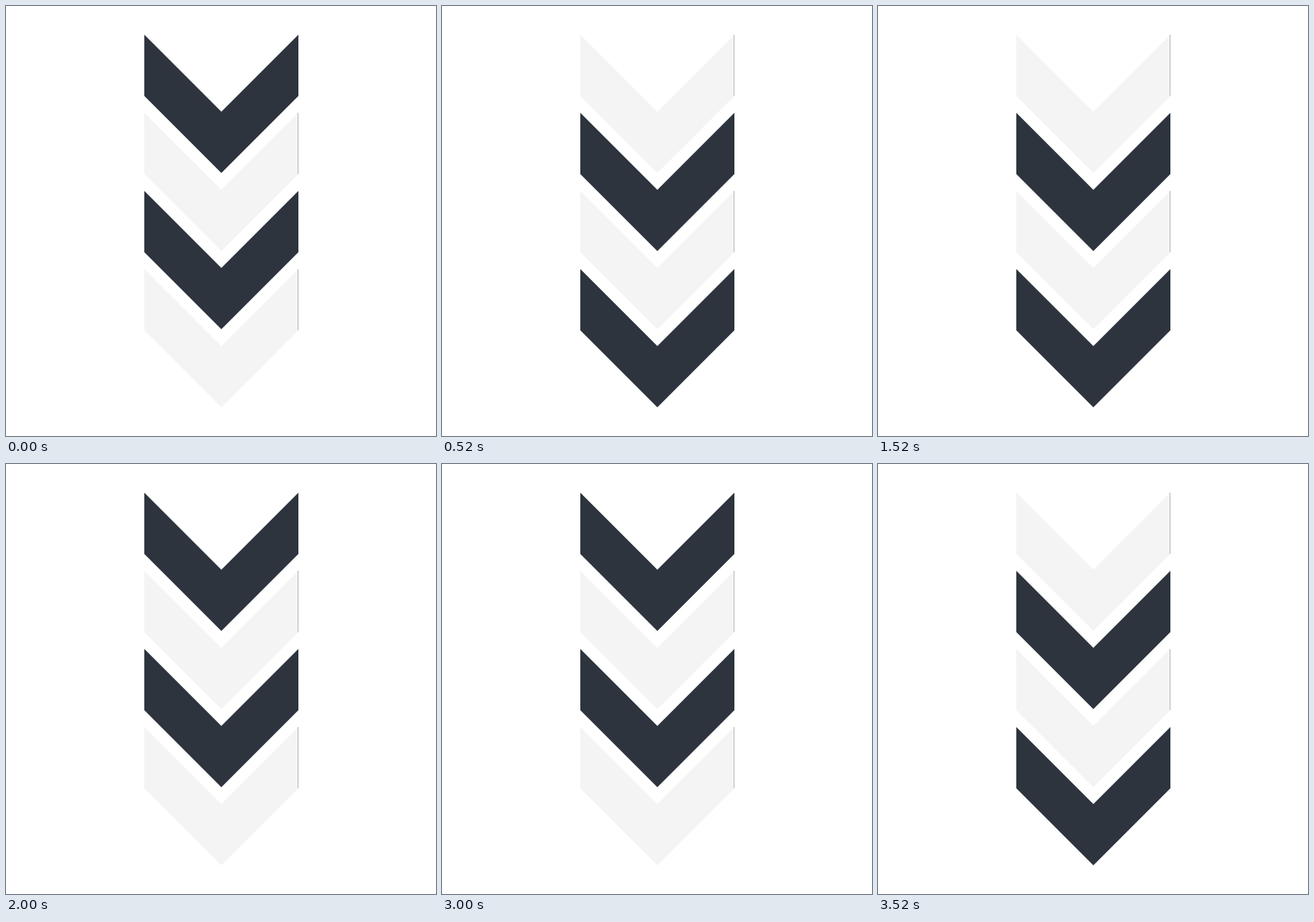
Animation, 600 px wide and 600 px high, one loop 4 s. Source, as an HTML page:

```html
<!DOCTYPE html>
<html lang="en">
<head>
<meta charset="utf-8">
<title>Alternating chevrons</title>
<style>
  html, body { margin: 0; width: 100%; height: 100%; overflow: hidden; background: #fff; }
  svg { display: block; width: 100vw; height: 100vh; }
  .chevron { fill: #f4f4f4; }
  .chevron line { stroke: #b4b4b4; }
  .chevron.dark { fill: #2d343e; }
  .chevron.dark line { stroke: none; }
</style>
</head>
<body>
<svg id="stage" viewBox="0 0 600 600"></svg>
<script>
  const COUNT = 4, TOP = 40, SPACING = 109;
  const PERIOD = 1000, SWITCH = 520;

  const stage = document.getElementById('stage');
  stage.innerHTML = Array.from({ length: COUNT }, (_, i) => `
    <g class="chevron" transform="translate(193 ${TOP + i * SPACING})">
      <path d="M0 0L107.5 107.5L215 0V85.5L107.5 193L0 85.5Z"/>
      <line x1="214.5" y1="0" x2="214.5" y2="85.5"/>
    </g>`).join('');
  const chevrons = [...stage.children];

  function draw(time) {
    const phase = time % PERIOD < SWITCH ? 0 : 1;
    chevrons.forEach((chevron, i) => chevron.classList.toggle('dark', i % 2 === phase));
  }

  const start = performance.now();
  function tick() {
    draw(performance.now() - start);
    requestAnimationFrame(tick);
  }
  tick();
</script>
</body>
</html>
```
